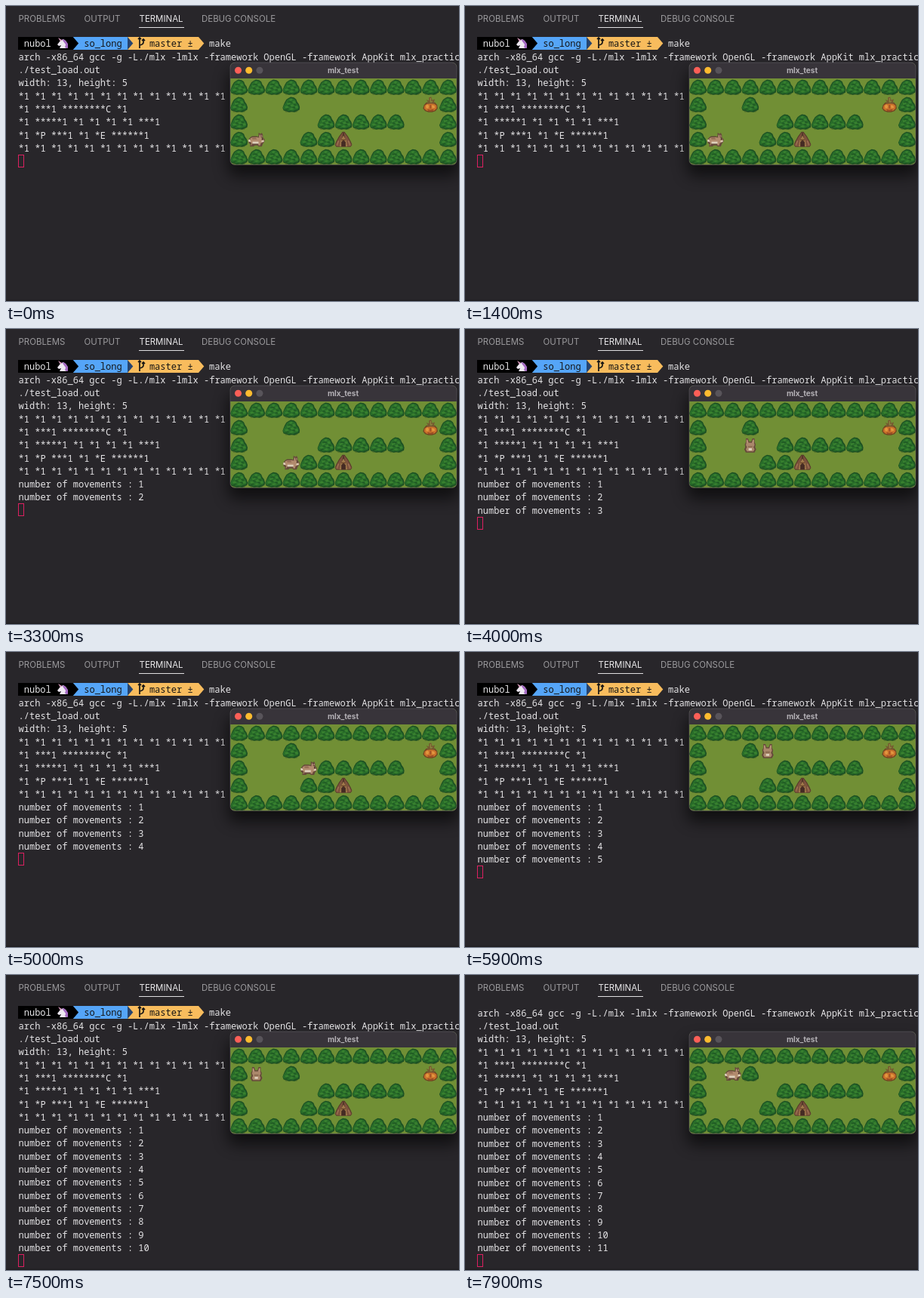
Write an HTML page that moves like this. It is 600x391 px and loops after 8 s.

```html
<!DOCTYPE html>
<html lang="en">
<head>
<meta charset="utf-8">
<title>Terminal tile game</title>
<style>
  html, body { margin: 0; width: 100%; height: 100%; overflow: hidden; background: #28262a; }
  svg { display: block; width: 600px; height: 391px; }
  text { white-space: pre; }
  .tabs { font: 11.45px Inter, Roboto, sans-serif; fill: #9b9a9d; }
  .mono { font: 500 12.04px "Noto Sans Mono", "DejaVu Sans Mono", monospace; fill: #e6e5e7; }
  .title { font: 700 10px Inter, Roboto, sans-serif; fill: #b4b1b6; text-anchor: middle; }
</style>
</head>
<body>
<svg viewBox="0 0 600 391">
  <defs>
    <clipPath id="terminalClip"><rect y="41" width="600" height="350"/></clipPath>
    <clipPath id="windowClip"><rect x="297" y="75" width="300" height="135.5" rx="6"/></clipPath>
    <filter id="shadow" x="-20%" y="-40%" width="140%" height="190%"><feGaussianBlur stdDeviation="10"/></filter>

    <symbol id="tree" viewBox="0 0 32 32">
      <path d="M3 27h26l-3 3H6z" fill="#51702c"/>
      <path d="M11 4l4-2 6 1 4 3 2 5 3 4 2 6-1 5-5 2-4 2-5-1-5 1-5-2-5-1-2-5 2-5 2-5 3-5z" fill="#1c5023"/>
      <path d="M12 5l4-1 4 1 4 3 1 5 3 3 2 5-2 4-5 1-4 2-4-1-4 1-4-2-5-1-1-4 2-4 3-5 2-4z" fill="#286c29"/>
      <path d="M12 7l4-2 3 2-4 3zM18 10l4-1 3 4-5 1zM8 13l5-2 2 3-6 3zM14 17l6-2 3 3-6 2zM4 20l5-2 3 3-6 2zM23 19l4-1 2 4-5 1zM12 24l5-2 4 2-5 2z" fill="#38812f"/>
      <path d="M10 11l5-1 3 2v1l-4-1-4 1zM8 18l4-1 3 2v1l-4-1zM20 15l5 1v2l-5-1zM17 21l5-1 2 3-4-1zM5 24l5-1 2 2-5 1z" fill="#1f5823"/>
    </symbol>

    <symbol id="crop" viewBox="0 0 32 32">
      <path d="M4 17l4-5h16l4 5 1 6-4 5-6 2h-7l-6-2-4-5z" fill="#704321"/>
      <path d="M5 18l5-4h12l5 4v5l-4 4-5 1h-5l-5-1-4-4z" fill="#c9702a"/>
      <path d="M7 18l4-2 2 3-1 4H8zM18 17l5 1 1 4-5 1z" fill="#e29640"/>
      <path d="M10 24l5 2 7-2-2 4h-8zM15 17h2v6h-2z" fill="#984c26"/>
      <path d="M15 14l-7 1 3-4-3-4 5 2V3l4-1 2 6 5-2-2 5 3 4-7-1z" fill="#755730"/>
      <path d="M15 12V4h2v6l4-1-3 3z" fill="#8c863f"/>
    </symbol>

    <symbol id="house" viewBox="0 0 32 32">
      <path d="M14 2h4l6 8 5 9 3 7-3 4H3l-3-4 3-7 5-9z" fill="#54372a"/>
      <path d="M15 3l-1 7-5 19H4l-3-3 3-6 5-9zM17 3l1 7 5 19h5l3-3-3-6-5-9z" fill="#7d523c"/>
      <path d="M16 9l5 9 2 11H9l2-11z" fill="#a27b4b"/>
      <path d="M16 17l4 4v8h-8v-8z" fill="#452b24"/>
      <path d="M12 16h8v2h-8z" fill="#684329"/>
      <path d="M6 18l2 1-3 8H3zM26 18l-2 1 3 8h2z" fill="#9b7052"/>
    </symbol>

    <symbol id="side" viewBox="0 0 32 32">
      <path d="M4 13l4-3h8l4 1V4l4 2 2-2 2 4v4l3 4v4l-3 4-2 5h-6l-2-2h-5l-2 2H4l1-4-3-2-1-5z" fill="#65493a"/>
      <path d="M5 14l4-2h8l4 1 1-5 2 4 4 2 2 4-3 4-3 1-1 4h-3l-1-4H9l-2 4H6l1-4-3-3z" fill="#b28b6e"/>
      <path d="M22 6l2 5h-2zM26 7l1 4h-2z" fill="#d7aa95"/>
      <path d="M1 17l3-1 2 4-4 1zM9 20h11v4H9zM26 18h4v3h-5z" fill="#ded0bb"/>
      <path d="M8 13h7l2 3H9z" fill="#946b55"/>
      <path d="M26 14h2v3h-2z" fill="#30231f"/>
    </symbol>

    <symbol id="back" viewBox="0 0 32 32">
      <path d="M8 4h4l2 6h4l2-6h4v7l2 4-1 5 2 4-3 6H8l-3-6 2-4-1-5 2-4z" fill="#65493a"/>
      <path d="M9 6h2l2 6h6l2-6h2v6l1 4-2 4 2 4-2 4H10l-2-4 2-4-2-4 1-4z" fill="#aa876b"/>
      <path d="M10 7h1v5h-1zM21 7h1v5h-1z" fill="#d0a48c"/>
      <path d="M13 22h6v4h-6z" fill="#ded0bb"/>
      <path d="M12 18h8v2h-8z" fill="#83634a"/>
    </symbol>

    <symbol id="front" viewBox="0 0 32 32">
      <use href="#back"/>
      <path d="M11 14h2v3h-2zM19 14h2v3h-2z" fill="#30231f"/>
      <path d="M13 17h6v3h-6z" fill="#ded0bb"/>
    </symbol>
  </defs>

  <rect width="600" height="391" fill="#28262a"/>

  <g class="tabs">
    <text x="16.5" y="21">PROBLEMS</text>
    <text x="103.5" y="21">OUTPUT</text>
    <text x="176.5" y="21" style="fill: #e8e7e9">TERMINAL</text>
    <text x="259" y="21">DEBUG CONSOLE</text>
    <rect x="176" y="28" width="60" height="1" fill="#e0dfe1"/>
  </g>

  <g clip-path="url(#terminalClip)">
    <g id="terminal" class="mono">
      <path d="M161 41h94l7.3 8.5-7.3 8.5h-94z" fill="#f8bc5d"/>
      <path d="M161 41l7.3 8.5-7.3 8.5z" fill="#26446f"/>
      <path d="M88 41h73v17H88z" fill="#55a5f8"/>
      <path d="M16 41h72.8l7.3 8.5-7.3 8.5H16z" fill="#000"/>
      <text x="23.7" y="54.4">nubol</text>
      <path d="M68 51l4-5 4-2 4 3 2 8-3 1h-8l2-4-3 1z" fill="#eee8f1"/>
      <path d="M74 44l4 1 4 5v6l-4-1 1-4-3-4z" fill="#a66bc4"/>
      <path d="M69 42l5 3-2 2z" fill="#d99bbd"/>
      <g style="fill: #151515">
        <text x="103.2" y="54.4">so_long</text>
        <text x="189.9" y="54.4">master ±</text>
      </g>
      <path d="M177 42v14M182 45v3q0 3-5 4M175 44l2-2 2 2M180 46l2-2 2 2" fill="none" stroke="#151515" stroke-width="1.7"/>
      <text x="269" y="54.4">make</text>
      <g id="lines"></g>
      <rect id="cursor" x="16.5" width="7" height="16" fill="none" stroke="#dc2060"/>
    </g>
  </g>

  <rect x="294" y="86" width="306" height="139" rx="10" fill="#000" opacity=".6" filter="url(#shadow)"/>
  <g clip-path="url(#windowClip)">
    <rect x="297" y="75" width="300" height="136" fill="#718f35"/>
    <rect x="297" y="75" width="300" height="21" fill="#38343a"/>
    <circle cx="307.5" cy="85.3" r="4.5" fill="#fd5f57"/>
    <circle cx="321.7" cy="85.3" r="4.5" fill="#fdbb2f"/>
    <circle cx="335.9" cy="85.3" r="4.5" fill="#58545a"/>
    <text class="title" x="446.5" y="88.5">mlx_test</text>
    <g id="board"></g>
    <g id="player"><use id="rabbit"/></g>
  </g>
  <rect x="297" y="75" width="300" height="135.5" rx="6" fill="none" stroke="#605d62" stroke-width=".6"/>
  <rect y="389.6" width="600" height="1.4" fill="#1e1d20"/>
</svg>

<script>
const LOOP = 8000, TILE = 300 / 13, LINE = 17.3;
const BOARD_X = 297, BOARD_Y = 96;
const MAX_LINES = 20;
const $ = id => document.getElementById(id);

const intro = [
  "arch -x86_64 gcc -g -L./mlx -lmlx -framework OpenGL -framework AppKit mlx_practice.c",
  "./test_load.out",
  "width: 13, height: 5",
  "*1 ".repeat(13),
  "*1 ***1 ********C *1",
  "*1 *****1 *1 *1 *1 *1 ***1",
  "*1 *P ***1 *1 *E ******1",
  "*1 ".repeat(13)
];
const map = [
  "1111111111111",
  "1..1.......C1",
  "1....11111..1",
  "1...11E.....1",
  "1111111111111"
];
const sprites = { 1: "tree", C: "crop", E: "house" };

const path = "RRURUDLLLUR";
const moveTimes = [2100, 3200, 3800, 4300, 5700, 6200, 6600, 6900, 7200, 7500, 7800];
const steps = {
  R: { dx: 1, dy: 0, sprite: "side" },
  L: { dx: -1, dy: 0, sprite: "side" },
  U: { dx: 0, dy: -1, sprite: "back" },
  D: { dx: 0, dy: 1, sprite: "front" }
};

function add(parent, name, attrs) {
  const node = document.createElementNS("http://www.w3.org/2000/svg", name);
  for (const key in attrs) node.setAttribute(key, attrs[key]);
  return parent.appendChild(node);
}

map.forEach((row, y) => [...row].forEach((cell, x) => {
  if (sprites[cell]) add($("board"), "use", {
    href: "#" + sprites[cell], x: BOARD_X + x * TILE, y: BOARD_Y + y * TILE,
    width: TILE, height: TILE
  });
}));

const messages = [...path].map((_, i) => `number of movements : ${i + 1}`);
const lineNodes = [...intro, ...messages].map((line, i) => {
  const node = add($("lines"), "text", { x: 16.5, y: Math.round(54.4 + (i + 1) * LINE) });
  node.textContent = line;
  return node;
});

const states = [{ x: 1, y: 3, dir: "R" }];
for (const dir of path) {
  const { x, y } = states.at(-1);
  states.push({ x: x + steps[dir].dx, y: y + steps[dir].dy, dir });
}

$("rabbit").setAttribute("width", TILE);
$("rabbit").setAttribute("height", TILE);

function render(time) {
  const moves = moveTimes.filter(t => t <= time).length;
  const { x, y, dir } = states[moves];
  const flip = dir === "L";
  const left = BOARD_X + (x + (flip ? 1 : 0)) * TILE;
  $("player").setAttribute("transform",
    `translate(${left} ${BOARD_Y + y * TILE}) scale(${flip ? -1 : 1} 1)`);
  $("rabbit").setAttribute("href", "#" + steps[dir].sprite);

  const shown = intro.length + moves;
  lineNodes.forEach((node, i) => node.setAttribute("visibility", i < shown ? "visible" : "hidden"));
  const cursorLine = shown + 1;
  $("cursor").setAttribute("y", Math.round(41 + cursorLine * LINE) + 0.5);
  const scroll = Math.max(0, cursorLine + 1 - MAX_LINES);
  $("terminal").setAttribute("transform", `translate(0 ${-Math.round(scroll * LINE)})`);
}

const start = performance.now();
function tick() {
  render((performance.now() - start) % LOOP);
  requestAnimationFrame(tick);
}
tick();
</script>
</body>
</html>
```
